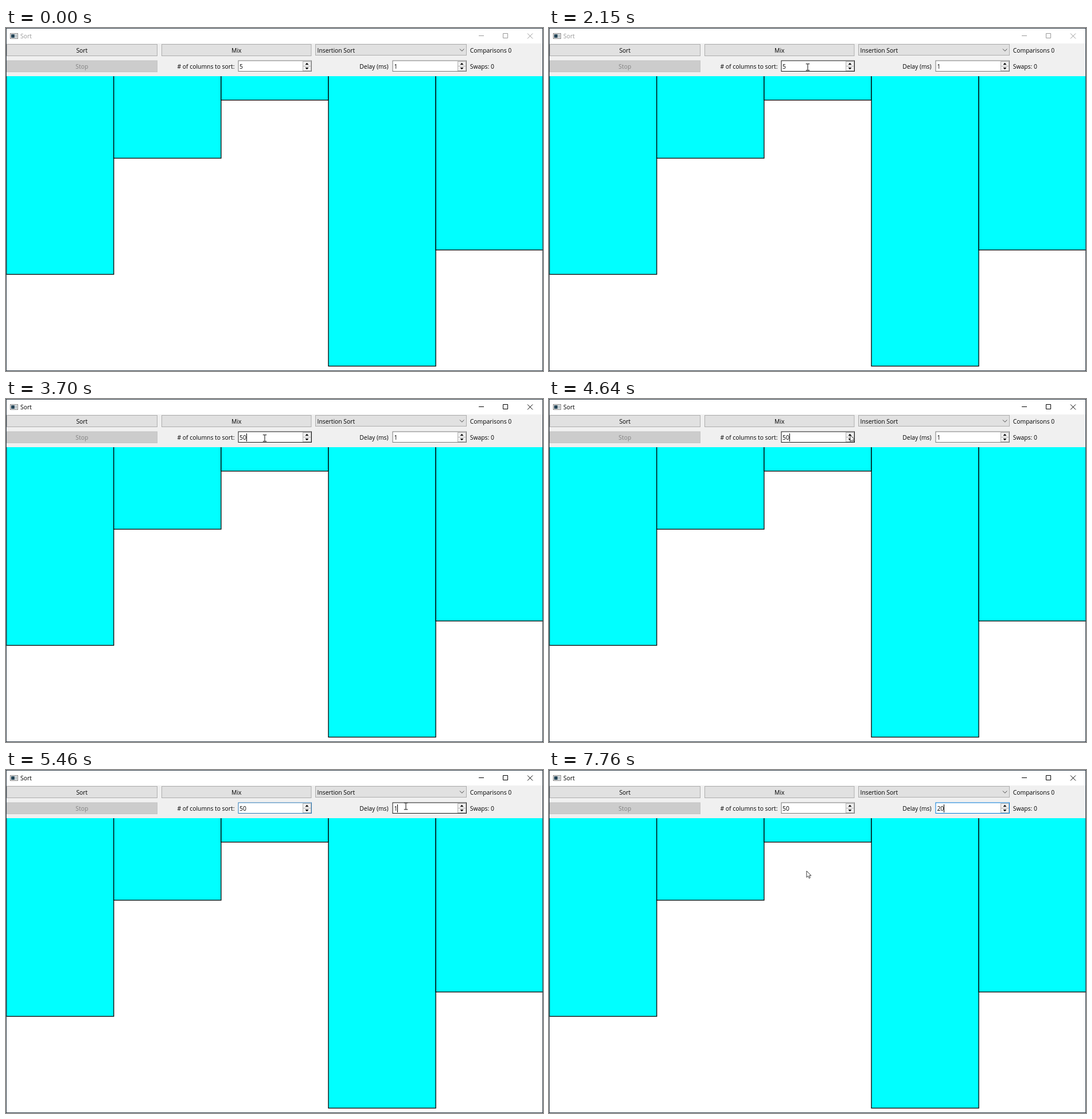
Recreate the animation shown at these times as an HTML page. Size 936 by 598 pixels, loop 8000 ms.

```html
<!DOCTYPE html>
<html lang="en">
<head>
<meta charset="utf-8">
<title>Sort</title>
<style>
  html, body { margin: 0; width: 100%; height: 100%; overflow: hidden; background: #fff; }
  svg { display: block; width: 936px; height: 598px; }
  text { font: 10.35px "Open Sans", "Noto Sans", sans-serif; fill: #000; }
  .mid { text-anchor: middle; }
  .button { fill: #e1e1e1; stroke: #adadad; }
  .line { fill: none; stroke: #000; }
  .off .line { stroke: #999; }
  .off text { fill: #999; }
</style>
</head>
<body>
<svg viewBox="0 0 936 598">
  <defs>
    <g id="spin">
      <rect x="112.5" y="1.5" width="14" height="16" fill="#f0f0f0" stroke="#b4b4b4"/>
      <path d="M112 9.5h15" stroke="#b4b4b4"/>
      <path d="M116.5 7l3-3.2 3 3.2zM116.5 12l3 3.2 3-3.2z"/>
    </g>
  </defs>
  <rect width="936" height="598" fill="#fff"/>
  <g id="bars" fill="#0ff" stroke="#000" stroke-width="1.3"></g>

  <g id="title">
    <rect x="7.5" y="9.5" width="13" height="9" fill="#eee" stroke="#888"/>
    <rect x="9" y="11" width="6" height="6" fill="#28485a"/>
    <rect x="16" y="11" width="3" height="6" fill="#b8c4c8"/>
    <text x="25" y="18">Sort</text>
    <path class="line" d="M824 13.5h9M866.5 9.5h8v8h-8zM909 9.5l9 9m0-9l-9 9"/>
  </g>

  <rect y="27" width="936" height="57" fill="#f0f0f0"/>
  <rect class="button" x="1.5" y="28.5" width="262" height="20"/>
  <text class="mid" x="132.3" y="43">Sort</text>
  <rect class="button" id="mix" x="271.5" y="28.5" width="260.5" height="20"/>
  <text class="mid" x="401.8" y="43">Mix</text>
  <rect class="button" x="539.5" y="28.5" width="263" height="19"/>
  <text x="542.6" y="43">Insertion Sort</text>
  <path class="line" d="M791 36.5l3.7 3.7 3.7-3.7" style="stroke:#444"/>
  <text x="808.8" y="43">Comparisons 0</text>

  <rect x="1.5" y="57" width="262" height="19.5" fill="#ccc" stroke="#c3c3c3"/>
  <text class="mid" x="132.3" y="71" style="fill:#838383">Stop</text>
  <text x="298.5" y="71"># of columns to sort:</text>
  <rect id="countBox" x="405" y="57" width="127.5" height="18.5" fill="#fff"/>
  <use href="#spin" x="405" y="57"/>
  <text id="count" x="407" y="71"></text>
  <text x="616.3" y="71">Delay (ms)</text>
  <rect id="delayBox" x="674" y="57" width="128.5" height="18.5" fill="#fff"/>
  <use href="#spin" x="675" y="57"/>
  <text id="delay" x="676.4" y="71"></text>
  <text x="808.8" y="71">Swaps: 0</text>
  <path id="caret" class="line" d="M0 60v14"/>

  <rect x=".5" y=".5" width="935" height="597" fill="none" stroke="#303c48"/>
  <path id="arrow" d="M0 0v11.2l2.6-2.4 1.8 4 1.9-.9-1.8-3.8h3.5z" fill="#fff" stroke="#222" stroke-width=".9"/>
  <path id="beam" d="M-3.2-5.5h2.4L0-4.9l.8-.6h2.4M0-4.9v10M-3.2 5.7h2.4L0 5.1l.8.6h2.4" fill="none" stroke="#505050" stroke-width="1.4"/>
</svg>
<script>
const $ = id => document.getElementById(id);
const LOOP = 8000;
const GRAY = [122, 122, 122], DARK = [23, 23, 23], BLUE = [0, 120, 215];
const FACE = [225, 225, 225], EDGE = [173, 173, 173], GLOW = [229, 241, 251];

$('bars').innerHTML = [429.5, 227, 125.7, 589.5, 387].map((bottom, i) =>
  `<rect x="${0.7 + 187.1 * i}" y="80" width="187.1" height="${bottom - 80}"/>`).join('');

// Pointer moves: start, end, and one place per step
const moves = [
  [1400, 2150, [[352, 2], [362, 20], [372, 38], [381, 52], [393, 72], [405, 86],
    [417, 91], [429, 91], [440, 88], [448, 78], [451, 71], [451, 68]]],
  [4430, 5190, [[451, 68], [463, 67], [490, 65], [525, 63], [565, 61], [605, 60],
    [640, 61], [670, 62], [688, 64], [695, 65], [695, 65], [695, 65]]],
  [5260, 5530, [[695, 65], [696, 63], [697, 61], [697, 63], [697, 65]]],
  [7070, 7760, [[697, 65], [690, 72], [668, 88], [635, 108], [600, 126],
    [563, 138], [525, 150], [490, 163], [462, 173], [449, 176]]]
];

function pointer(t) {
  const move = moves.filter(m => t >= m[0]).pop();
  if (!move) return null;
  const [start, end, path] = move, last = path.length - 1;
  return path[Math.min(last, Math.floor((t - start) / (end - start) * last + 0.25))];
}

const mix = (a, b, k) => `rgb(${a.map((v, i) => v + (b[i] - v) * k)})`;
const ramp = (t, start, length) => Math.max(0, Math.min(1, (t - start) / length));

// Each fade is [start, length, colour]
function fade(t, from, fades) {
  let to = from, k = 0;
  for (const [start, length, colour] of fades) {
    if (t < start) break;
    from = to;
    to = colour;
    k = ramp(t, start, length);
  }
  return mix(from, to, k);
}

const inField = (x, y) => y > 57 && y < 76 && (x > 405 && x < 518 || x > 674 && x < 788);

function place(id, show, [x, y]) {
  $(id).style.display = show ? '' : 'none';
  $(id).setAttribute('transform', `translate(${x} ${y})`);
}

function draw(t) {
  $('title').setAttribute('class', t < 2420 ? 'off' : '');
  $('count').textContent = t < 3700 ? '5' : '50';
  $('delay').textContent = t < 5870 ? '1' : t < 6210 ? '' : t < 6410 ? '2' : '20';

  const glow = 0.4 * ramp(t, 1460, 90) * (1 - ramp(t, 1550, 350));
  $('mix').style.fill = mix(FACE, GLOW, glow);
  $('mix').style.stroke = mix(EDGE, BLUE, glow);
  $('countBox').style.stroke = fade(t, GRAY, [[2010, 140, DARK], [4690, 200, BLUE], [5330, 370, GRAY]]);
  $('delayBox').style.stroke = fade(t, GRAY, [[4965, 160, DARK], [7205, 400, BLUE]]);

  const caretX = t < 3700 ? 413.5 : t < 5330 ? 419.5 : t < 5870 ? 682.5 :
    t < 6210 ? 676.5 : t < 6410 ? 682.5 : 688.5;
  place('caret', t >= 2420 && !(t >= 2950 && t < 3430), [caretX, 0]);

  const at = pointer(t), beam = at && inField(...at);
  place('arrow', at && !beam, at || [0, 0]);
  place('beam', beam, at || [0, 0]);
}

let origin;
function tick(now) {
  origin ??= now;
  draw((now - origin) % LOOP);
  requestAnimationFrame(tick);
}
draw(0);
requestAnimationFrame(tick);
</script>
</body>
</html>
```
